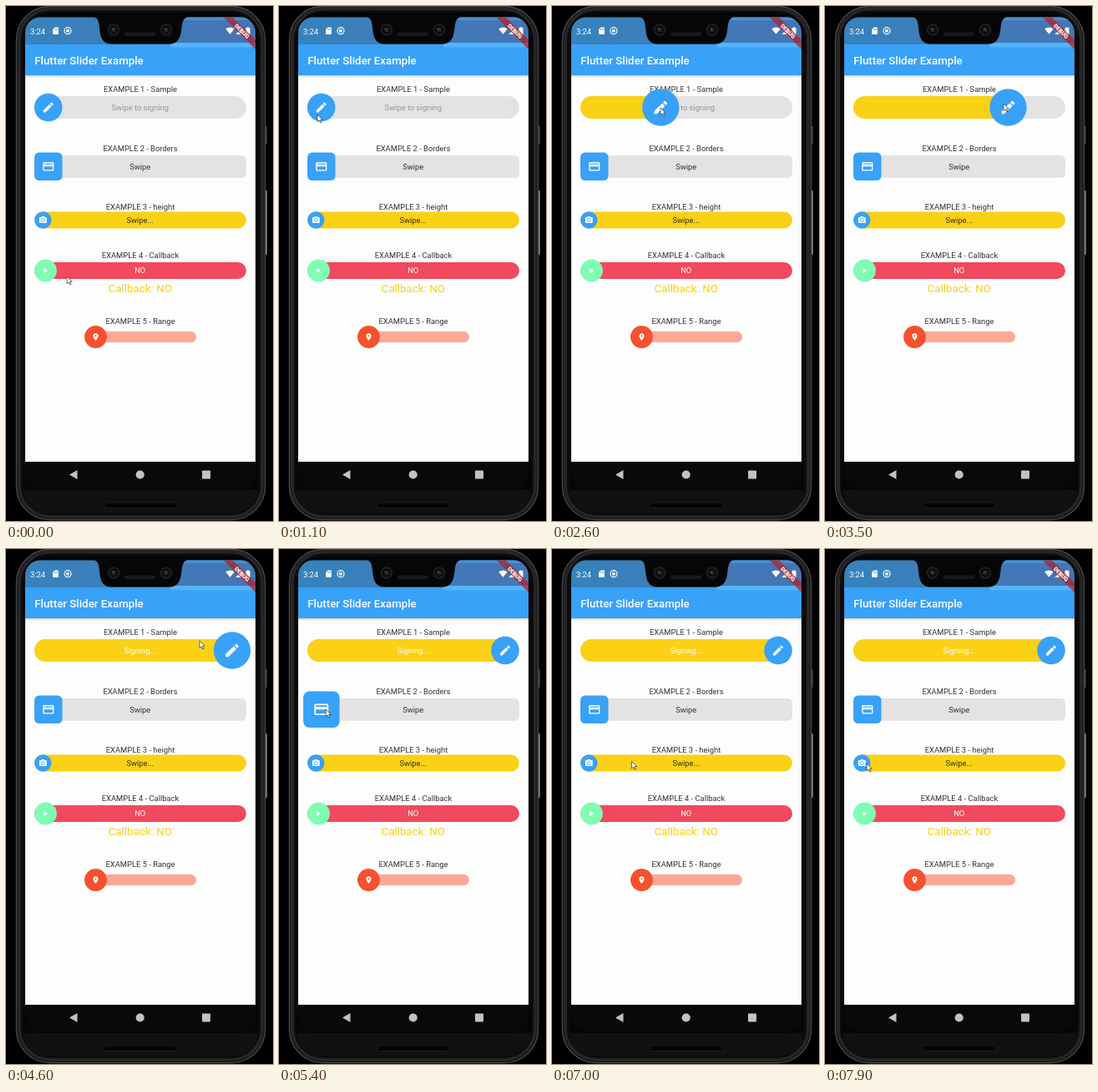
Write an HTML page with a canvas that moves like this. It is 320 px wide and 617 px high and loops after 8 s.

```html
<!DOCTYPE html>
<html lang="en">
<head>
<meta charset="utf-8">
<title>Slider example</title>
<style>
html, body { margin: 0; width: 100%; height: 100%; overflow: hidden; background: #000; }
canvas { display: block; width: 320px; height: 617px; }
</style>
</head>
<body>
<canvas id="stage"></canvas>
<script>
const W = 320, H = 617, LOOP = 8000, STEP = 100;
const canvas = document.getElementById('stage');
const ctx = canvas.getContext('2d');
const dpr = window.devicePixelRatio || 1;
canvas.width = W * dpr;
canvas.height = H * dpr;

const BLUE = '#38a1f8', YELLOW = '#fad115', RED = '#f1495d', GREY = '#e4e2e4';
const FONT = 'Roboto, "Open Sans", sans-serif';

// 24-unit icons
const ICON = {
  edit: new Path2D('M3 17.25V21h3.75L17.81 9.94l-3.75-3.75zM20.71 7.04c.39-.39.39-1.02 0-1.41l-2.34-2.34c-.39-.39-1.02-.39-1.41 0l-1.83 1.83 3.75 3.75z'),
  card: new Path2D('M20 4H4a2 2 0 0 0-2 2v12a2 2 0 0 0 2 2h16a2 2 0 0 0 2-2V6a2 2 0 0 0-2-2zm0 14H4v-6h16zm0-10H4V6h16z'),
  camera: new Path2D('M9 2L7.2 4H4a2 2 0 0 0-2 2v12a2 2 0 0 0 2 2h16a2 2 0 0 0 2-2V6a2 2 0 0 0-2-2h-3.2L15 2zM12 7a5 5 0 0 1 0 10a5 5 0 0 1 0-10zM12 8.8a3.2 3.2 0 0 0 0 6.4a3.2 3.2 0 0 0 0-6.4z'),
  play: new Path2D('M8 5v14l11-7z'),
  pin: new Path2D('M12 2a7 7 0 0 0-7 7c0 5.25 7 13 7 13s7-7.75 7-13a7 7 0 0 0-7-7zm0 4.5a2.5 2.5 0 0 1 0 5a2.5 2.5 0 0 1 0-5z'),
  sd: new Path2D('M18 2h-8L4 8v12a2 2 0 0 0 2 2h12a2 2 0 0 0 2-2V4a2 2 0 0 0-2-2zM9 6h2v4H9zm3.2 0h2v4h-2zm3.2 0h2v4h-2z'),
  wifi: new Path2D('M12 21.5L0 7C3 4.500 7 3 12 3s9 1.500 12 4z'),
  signal: new Path2D('M2 22h20V2z'),
  battery: new Path2D('M9 2h6v2h3v18H6V4h3z')
};
const ARROW = new Path2D('M0 0V9.600L2.300 7.500L3.900 11.100L5.500 10.400L3.900 6.900H7z');

// Motion: [time, value...]
const pointer = [
  [0, 73, 324], [300, 72, 318], [900, 48, 142], [1100, 46, 130], [1700, 46, 126],
  [2600, 130, 122], [3500, 214, 117], [4000, 264, 116], [4300, 258, 114],
  [4600, 232, 110], [5200, 56, 190], [5400, 56, 192], [5900, 172, 200],
  [6200, 168, 221], [6600, 140, 244], [7300, 62, 262], [7900, 50, 257]
];
const firstX = [[1700, 50.7], [2600, 130.3], [3500, 219.5], [4000, 271]];
const firstGrow = [[1500, 0], [1700, 1], [4600, 1], [4900, 0]];
const secondX = [[5400, 50.8], [5900, 166], [6100, 158], [6200, 150], [6500, 50.8]];
const secondGrow = [[5250, 0], [5400, 1], [6200, 1], [6500, 0]];

function at(keys, t) {
  if (t <= keys[0][0]) return keys[0].slice(1);
  for (let i = 1; i < keys.length; i++) {
    const a = keys[i - 1], b = keys[i];
    if (t <= b[0]) {
      const p = (t - a[0]) / (b[0] - a[0]);
      return a.slice(1).map((v, k) => v + (b[k + 1] - v) * p);
    }
  }
  return keys[keys.length - 1].slice(1);
}

function box(x, y, w, h, r, fill, stroke, line = 1) {
  ctx.beginPath();
  ctx.roundRect(x, y, w, h, r);
  if (fill) { ctx.fillStyle = fill; ctx.fill(); }
  if (stroke) { ctx.strokeStyle = stroke; ctx.lineWidth = line; ctx.stroke(); }
}

function disc(x, y, r, fill) {
  ctx.beginPath();
  ctx.arc(x, y, r, 0, Math.PI * 2);
  ctx.fillStyle = fill;
  ctx.fill();
}

function text(str, x, y, size, color, align = 'center', weight = 400) {
  ctx.font = `${weight} ${size}px ${FONT}`;
  ctx.textAlign = align;
  ctx.fillStyle = color;
  ctx.fillText(str, x, y);
}

function icon(name, x, y, scale, color = '#fff') {
  ctx.save();
  ctx.translate(x, y);
  ctx.scale(scale, scale);
  ctx.translate(-12, -12);
  ctx.fillStyle = color;
  ctx.fill(ICON[name], 'evenodd');
  ctx.restore();
}

function fillTrack(y, h, r, x, color) {
  ctx.save();
  ctx.beginPath();
  ctx.roundRect(34, y, 254, h, r);
  ctx.clip();
  ctx.fillStyle = color;
  ctx.fillRect(34, y, x - 34, h);
  ctx.restore();
}

function phone() {
  ctx.fillStyle = '#000';
  ctx.fillRect(0, 0, W, H);
  box(310.5, 144, 2.5, 22, 1, '#3a3a3c');
  box(310.5, 221, 2.5, 77, 1, '#77777a');
  box(12.5, 0.5, 298, 615, 40, '#0a0a0b', '#48484a', 1.5);
  box(16, 3.5, 291, 608.5, 37, null, '#252527', 4);
  box(20, 7.5, 283, 600.5, 32, '#060607', '#0e0e0f', 1);
  box(21, 580, 281, 27, [0, 0, 30, 30], '#111113');
  box(117.5, 595, 87, 6.5, 3, '#050506', '#1d1d1f', 1);
}

function statusBar() {
  const sky = ctx.createLinearGradient(23, 0, 299, 0);
  sky.addColorStop(0, '#3683bd');
  sky.addColorStop(1, '#4674b4');
  ctx.fillStyle = sky;
  ctx.fillRect(23, 13, 276, 33);
  ctx.fillStyle = '#4690d4';
  ctx.fillRect(214, 13, 85, 4);
  ctx.fillStyle = BLUE;
  ctx.fillRect(23, 46, 276, 37);
  box(197, 44, 102, 5.5, [2, 0, 0, 2], '#52b4fc');
  text('3:24', 29, 33.5, 9.4, '#fff', 'left');
  icon('sd', 59.5, 29.7, 0.42);
  ctx.beginPath();
  ctx.arc(74, 29.7, 4, 0, Math.PI * 2);
  ctx.strokeStyle = '#fff';
  ctx.lineWidth = 1.2;
  ctx.stroke();
  disc(74, 29.7, 2, '#fff');
  icon('wifi', 268.5, 29.7, 0.43);
  icon('signal', 279.5, 29.7, 0.42);
  icon('battery', 290, 29.7, 0.42);
}

function notch() {
  ctx.beginPath();
  ctx.moveTo(104, 12.5);
  ctx.quadraticCurveTo(111, 14, 111.5, 22);
  ctx.lineTo(112.5, 30);
  ctx.quadraticCurveTo(114, 45.5, 126, 45.5);
  ctx.lineTo(196, 45.5);
  ctx.quadraticCurveTo(208, 45.5, 210, 30);
  ctx.lineTo(211, 22);
  ctx.quadraticCurveTo(212, 14, 219, 12.5);
  ctx.closePath();
  ctx.fillStyle = '#060607';
  ctx.fill();
  box(142, 31.5, 37, 4.5, 2, '#19191b');
  for (const x of [129, 192]) {
    disc(x, 28.5, 7.5, '#1b1c1e');
    disc(x, 28.5, 5, '#0a0a0b');
    disc(x, 28.5, 2.8, '#25282b');
    disc(x - 1, 27.5, 1, '#484d52');
  }
}

function banner() {
  ctx.save();
  ctx.translate(299, 14);
  ctx.rotate(Math.PI / 4);
  ctx.fillStyle = 'rgba(176,32,36,.72)';
  ctx.fillRect(-27, 18.8, 54, 8);
  text('DEBUG', 0, 25.2, 6.8, '#fff', 'center', 900);
  ctx.restore();
}

function navBar() {
  ctx.fillStyle = '#08090a';
  ctx.fillRect(23, 546, 276, 32);
  ctx.beginPath();
  ctx.moveTo(76, 561.5);
  ctx.lineTo(85.5, 556);
  ctx.lineTo(85.5, 567);
  ctx.fillStyle = '#c2c2c3';
  ctx.fill();
  disc(160.7, 561.5, 5.1, '#c2c2c3');
  box(235, 556.5, 10, 10, 1, '#c2c2c3');
}

function sliders(t) {
  const ink = '#343434';
  const label = (str, y) => text(str, 161, y, 9.4, ink);
  label('EXAMPLE 1 - Sample', 103);
  label('EXAMPLE 2 - Borders', 173.8);
  label('EXAMPLE 3 - height', 244.4);
  label('EXAMPLE 4 - Callback', 302);
  label('EXAMPLE 5 - Range', 381.3);

  // 1
  const [x1] = at(firstX, t), s1 = 1 + 0.32 * at(firstGrow, t)[0];
  box(34, 108, 254, 27, 13.5, GREY);
  text('Swipe to signing', 160.7, 124.8, 9.4, '#969596');
  fillTrack(108, 27, 13.5, x1, YELLOW);
  if (t >= 4000) text('Signing...', 160.7, 124.8, 9.4, '#fff');
  disc(x1, 121.5, 16.8 * s1, BLUE);
  icon('edit', x1, 121.5, 0.66 * s1);

  // 2
  const [x2] = at(secondX, t), s2 = 1 + 0.3 * at(secondGrow, t)[0];
  const half = 16.7 * s2;
  box(34, 179, 254, 26.8, 5.5, GREY);
  text('Swipe', 160.7, 195.6, 9.4, ink);
  fillTrack(179, 26.8, 5.5, x2, RED);
  if (t >= 6100 && t < 6400) disc(x2 + 4, 193, 26, 'rgba(60,50,60,.05)');
  box(x2 - half, 192.3 - half, half * 2, half * 2, 5.5 * s2, BLUE);
  icon('card', x2, 192.3, 0.65 * s2);

  // 3
  box(34, 246.5, 254, 20, 10, YELLOW);
  text('Swipe...', 160.7, 259.8, 9.4, '#37321c');
  disc(44.3, 256.5, 10.2, BLUE);
  icon('camera', 44.3, 256.5, 0.44);

  // 4
  box(34, 307, 254, 20, 10, RED);
  text('NO', 160.7, 320.4, 9.4, '#fff');
  disc(47.5, 317, 13.4, '#7ffdb2');
  icon('play', 47, 317, 0.42);
  text('Callback: NO', 160.7, 343.3, 13.4, YELLOW);

  // 5
  box(94, 389.7, 134, 13.4, 6.7, '#fba996');
  disc(107.5, 396.5, 13.4, '#f4512e');
  icon('pin', 107.5, 396.5, 0.43);
}

function cursor(t) {
  const [x, y] = at(pointer, t);
  ctx.save();
  ctx.translate(x, y);
  ctx.scale(0.9, 0.9);
  ctx.fillStyle = '#fff';
  ctx.fill(ARROW);
  ctx.strokeStyle = '#333';
  ctx.lineWidth = 0.8;
  ctx.stroke(ARROW);
  ctx.restore();
}

function draw(t) {
  ctx.setTransform(dpr, 0, 0, dpr, 0, 0);
  phone();
  ctx.save();
  ctx.beginPath();
  ctx.roundRect(23, 13.5, 276, 564.5, 18);
  ctx.clip();
  ctx.fillStyle = '#fefdfe';
  ctx.fillRect(23, 83, 276, 463);
  const shade = ctx.createLinearGradient(0, 83, 0, 86);
  shade.addColorStop(0, 'rgba(0,0,0,.18)');
  shade.addColorStop(1, 'rgba(0,0,0,0)');
  ctx.fillStyle = shade;
  ctx.fillRect(23, 83, 276, 3);
  statusBar();
  text('Flutter Slider Example', 34.2, 69.8, 13.3, '#fff', 'left', 500);
  banner();
  navBar();
  sliders(t);
  ctx.restore();
  notch();
  cursor(t);
}

const start = performance.now();
function tick() {
  const t = (performance.now() - start) % LOOP;
  draw(Math.floor(t / STEP) * STEP);
  requestAnimationFrame(tick);
}
tick();
</script>
</body>
</html>
```
